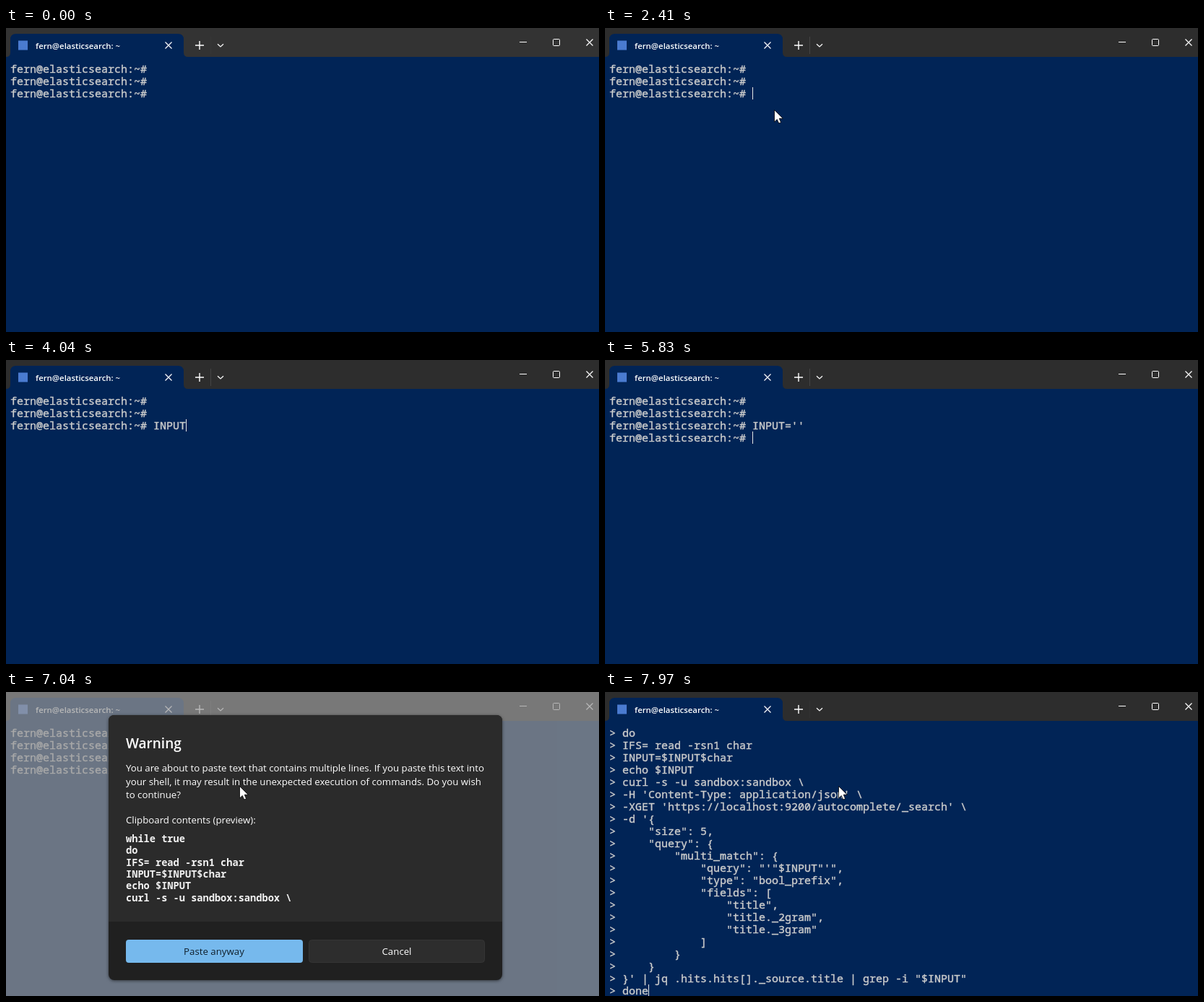
Recreate the animation shown at these times as an HTML page. Size 821 px wide and 421 px high, loop 8 s.

```html
<!DOCTYPE html>
<html lang="en">
<head>
<meta charset="utf-8">
<title>Terminal</title>
<style>
  html, body { margin: 0; width: 100%; height: 100%; overflow: hidden; background: #012456; }
  #stage { position: absolute; left: 0; top: 0; width: 821px; height: 421px; overflow: hidden; background: #012456; }
  #stage > * { position: absolute; left: 0; top: 0; }
  svg { display: block; width: 821px; height: 421px; overflow: hidden; }

  /* Every part runs on the same 8 s clock with hard changes. */
  .a { animation: 8s step-end infinite; }

  pre, #typed {
    margin: 0; color: #ccc; white-space: pre;
    font: 500 15px/17px "Noto Sans Mono", monospace;
    font-variant-ligatures: none;
    -webkit-text-stroke: .4px #ccc;
  }
  #stage > pre { left: 6px; top: 48px; }
  #stage > #typed { left: 204px; top: 82px; height: 17px; width: 0; overflow: hidden; animation-name: typed; }
  #caret { width: 1px; height: 17px; background: #e6e6e6; animation-name: caret; }
  #shell { animation-name: shell; }
  #next { animation-name: next; }
  #script { animation-name: script; }

  .ui { font: 13.25px "Open Sans", sans-serif; fill: #fff; }
  .tab { font-size: 11.4px; font-weight: 600; }
  .head { font-size: 19px; font-weight: 600; }
  .mid { text-anchor: middle; }
  .mono { font: 600 13.67px "Noto Sans Mono", monospace; fill: #f2f2f2; white-space: pre; }
  .line { fill: none; stroke: #fff; }

  #bar { animation-name: bar; }
  #split { animation-name: split; }
  #dialog { animation-name: dialog; }
  #paste { animation-name: paste; }
  #label { animation-name: label; }
  #mouse { animation-name: mouse; }
  #click { animation-name: click; }

  @keyframes bar { 0% { fill: #333 } 29.25%, 100% { fill: #2d2d2d } }
  @keyframes split { 0% { opacity: .2 } 29.25% { opacity: 1 } 99.625%, 100% { opacity: .2 } }
  @keyframes shell { 0% { visibility: visible } 99.625%, 100% { visibility: hidden } }
  @keyframes next { 0% { visibility: hidden } 72.875% { visibility: visible } 99.625%, 100% { visibility: hidden } }
  @keyframes script { 0% { visibility: hidden } 99.625%, 100% { visibility: visible } }
  @keyframes typed {
    0% { width: 0 }
    43% { width: 9px }
    43.875% { width: 18px }
    47.125% { width: 27px }
    48% { width: 36px }
    50.5% { width: 45px }
    58.75% { width: 54px }
    63.75% { width: 63px }
    65.375% { width: 72px }
    99.625%, 100% { width: 0 }
  }
  @keyframes caret {
    0% { transform: translate(204px, 82px); opacity: 0 }
    29.25% { transform: translate(204px, 82px); opacity: 1 }
    43% { transform: translate(213px, 82px) }
    43.875% { transform: translate(222px, 82px) }
    47.125% { transform: translate(231px, 82px) }
    48% { transform: translate(240px, 82px) }
    50.5% { transform: translate(249px, 82px) }
    58.75% { transform: translate(258px, 82px) }
    63.75% { transform: translate(267px, 82px) }
    65.375% { transform: translate(276px, 82px) }
    72.875% { transform: translate(204px, 99px) }
    99.625%, 100% { transform: translate(60px, 405px); opacity: 1 }
  }
  @keyframes dialog { 0% { visibility: hidden } 88% { visibility: visible } 99.625%, 100% { visibility: hidden } }
  @keyframes paste { 0% { fill: #76b9ed } 98%, 100% { fill: #6399c5 } }
  @keyframes label { 0% { fill: #10202c } 98%, 100% { fill: #3a5a74 } }
  @keyframes mouse {
    0% { transform: translate(791px, 430px) }
    4.875% { transform: translate(791px, 419px) }
    7.625% { transform: translate(758px, 402px) }
    8.5% { transform: translate(669px, 353px) }
    9.25% { transform: translate(541px, 282px) }
    10.125% { transform: translate(413px, 212px) }
    11% { transform: translate(313px, 157px) }
    11.75% { transform: translate(257px, 126px) }
    12.625% { transform: translate(235px, 114px) }
    23.375% { transform: translate(234px, 113px) }
    43% { transform: translate(234px, 430px) }
    82.875% { transform: translate(240px, 114px) }
    83.75% { transform: translate(268px, 120px) }
    84.625% { transform: translate(300px, 126px) }
    85.375% { transform: translate(318px, 129px) }
    86.25%, 100% { transform: translate(323px, 130px) }
  }
  @keyframes click {
    0% { visibility: hidden }
    28.375% { visibility: visible }
    30.125% { visibility: hidden }
    86.25% { visibility: visible }
    88%, 100% { visibility: hidden }
  }
</style>
</head>
<body>
<div id="stage">
  <svg viewBox="0 0 821 421">
    <rect id="bar" class="a" width="821" height="40" fill="#333"/>
    <path d="M0 40Q6 40 6 34V16Q6 8 14 8H238Q246 8 246 16V34Q246 40 252 40Z" fill="#012456"/>
    <rect x="17" y="17.500" width="13" height="13" fill="#4a7bd0"/>
    <text class="ui tab" x="41" y="29">fern@elasticsearch: ~</text>
    <path id="split" class="a line" d="M283.500 12V36" style="stroke:#444"/>
    <path class="line" stroke-width="1.200" d="M220.500 19.500l9 9m0-9l-9 9M293 22.300l4 3.700 4-3.700"/>
    <path class="line" stroke-width="1.400" d="M262 24H274M268 18V30"/>
    <path class="line" d="M711 19.500H721"/>
    <rect class="line" x="757.500" y="15.500" width="9" height="9" rx="1"/>
    <path class="line" stroke-width="1.200" d="M803.500 15.500l9 9m0-9l-9 9"/>
  </svg>

  <pre id="shell" class="a">fern@elasticsearch:~#
fern@elasticsearch:~#
fern@elasticsearch:~#
<span id="next" class="a">fern@elasticsearch:~#</span></pre>
  <div id="typed" class="a">INPUT=''</div>

  <pre id="script" class="a">&gt; do
&gt; IFS= read -rsn1 char
&gt; INPUT=$INPUT$char
&gt; echo $INPUT
&gt; curl -s -u sandbox:sandbox \
&gt; -H 'Content-Type: application/json' \
&gt; -XGET 'https://localhost:9200/autocomplete/_search' \
&gt; -d '{
&gt;     "size": 5,
&gt;     "query": {
&gt;         "multi_match": {
&gt;             "query": "'"$INPUT"'",
&gt;             "type": "bool_prefix",
&gt;             "fields": [
&gt;                 "title",
&gt;                 "title._2gram",
&gt;                 "title._3gram"
&gt;             ]
&gt;         }
&gt;     }
&gt; }' | jq .hits.hits[]._source.title | grep -i "$INPUT"
&gt; done</pre>
  <div id="caret" class="a"></div>

  <svg id="dialog" class="a" viewBox="0 0 821 421">
    <rect width="821" height="421" fill="#999" fill-opacity=".7"/>
    <rect x="142" y="32" width="545" height="367" rx="8" fill="#202020" style="filter:drop-shadow(0 1px 2px #0008)"/>
    <path d="M142 318V40Q142 32 150 32H679Q687 32 687 40V318Z" fill="#2b2b2b"/>
    <g class="ui">
      <text class="head" x="166" y="78">Warning</text>
      <text x="166" y="110">You are about to paste text that contains multiple lines. If you paste this text into</text>
      <text x="166" y="128.600">your shell, it may result in the unexpected execution of commands. Do you wish</text>
      <text x="166" y="147">to continue?</text>
      <text x="166" y="182">Clipboard contents (preview):</text>
    </g>
    <g class="mono">
      <text x="166" y="208">while true</text>
      <text x="166" y="224.300">do</text>
      <text x="166" y="240.600">IFS= read -rsn1 char</text>
      <text x="166" y="256.900">INPUT=$INPUT$char</text>
      <text x="166" y="273.200">echo $INPUT</text>
      <text x="166" y="289.500">curl -s -u sandbox:sandbox \</text>
    </g>
    <rect id="paste" class="a" x="166" y="343" width="245" height="32" rx="4" fill="#76b9ed"/>
    <rect x="419.500" y="343.500" width="243" height="31" rx="4" fill="#2d2d2d" stroke="#353535"/>
    <g class="ui mid">
      <text id="label" class="a" x="288" y="364">Paste anyway</text>
      <text x="541" y="364">Cancel</text>
    </g>
  </svg>

  <svg viewBox="0 0 821 421">
    <g id="mouse" class="a">
      <path d="M.5 .5V17L4.300 13.500 6.700 19 9.600 17.800 7.300 12.300H12.300Z" fill="#fff" stroke="#000" stroke-width=".8"/>
      <circle id="click" class="a" r="12" fill="red" fill-opacity=".5"/>
    </g>
  </svg>
</div>
</body>
</html>
```
